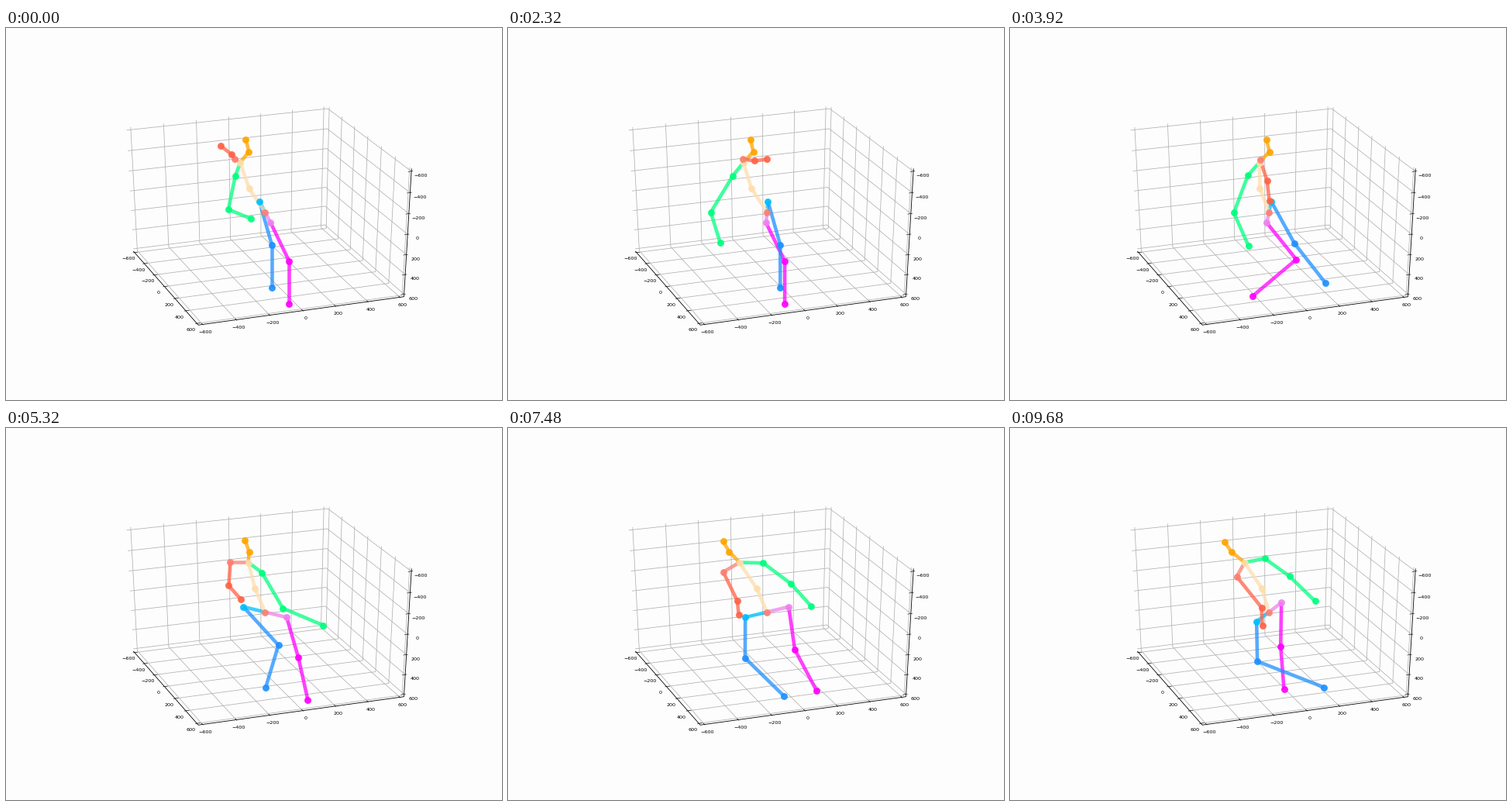
Recreate the animation shown at these times as a matplotlib script. Size 640 px wide and 480 px high, loop 9720 ms.

```python
import numpy as np
import matplotlib.pyplot as plt
from matplotlib.animation import FuncAnimation

W, H, DPI = 640, 480, 100
FRAMES, STEP = 243, 40

fig = plt.figure(figsize=(W / DPI, H / DPI), dpi=DPI, facecolor="#fdfdfd")
ax = fig.add_axes([0, 0, 1, 1])
ax.set_xlim(0, W)
ax.set_ylim(H, 0)
ax.axis("off")

# ---- perspective room ----
ELEV, AZIM, DIST = np.radians(30), np.radians(70), 10
SCALE_X, SCALE_Y, CENTER = 2681, 1798, (334.3, 237.5)
EDGE = 0.5 + 1 / 48


def project(x, y, z):
    """Unit cube centred on zero (y away, z up) to stage pixels."""
    right = x * np.sin(AZIM) - y * np.cos(AZIM)
    near = -x * np.cos(AZIM) - y * np.sin(AZIM)
    up = z * np.cos(ELEV) - near * np.sin(ELEV)
    depth = DIST - near * np.cos(ELEV) - z * np.sin(ELEV)
    return (CENTER[0] + SCALE_X * right / depth,
            CENTER[1] - SCALE_Y * up / depth)


def path(points, color="black", width=0.6, z=1.5):
    xs, ys = zip(*(project(*p) for p in points))
    ax.plot(xs, ys, color=color, lw=width, zorder=z, solid_capstyle="butt")


def label(pos, offset, value):
    x, y = project(*pos)
    text = str(value).replace("-", "\u2212")
    ax.text(x + offset[0], y + offset[1], text, fontsize=4.6,
            family="DejaVu Sans", ha="center", va="center")


def draw_room():
    e, out, inn = EDGE, EDGE + 1 / 120, EDGE - 1 / 60
    for value in range(-600, 601, 200):
        t = value / 1200
        for line in ([(t, e, e), (t, e, -e), (t, -e, -e)],
                     [(e, -t, e), (e, -t, -e), (-e, -t, -e)],
                     [(-e, e, -t), (e, e, -t), (e, -e, -t)]):
            path(line, "#b0b0b0", 0.55, 1)
        path([(t, -out, -e), (t, -inn, -e)], width=0.4)
        path([(-out, -t, -e), (-inn, -t, -e)], width=0.4)
        path([(out, -e, -t), (inn, -e, -t)], width=0.4)
        label((t, -e, -e), (3.4, 10), value)
        label((-e, -t, -e), (-7.8, 8.2), value)
        label((e, -e, -t), (12.2, 5.6), value)
    path([(-e, e, -e), (-e, -e, -e), (e, -e, -e), (e, -e, e)])


draw_room()

# ---- walking figure ----
ROOT = np.array([334.2, 237.5])
time = np.arange(FRAMES) * STEP / 1000


def ease(start, end):
    u = np.clip((time - start) / (end - start), 0, 1)
    return u * u * (3 - 2 * u)


def curve(*keys):
    """Smooth curve through (time, value...) keys."""
    keys = np.array(keys, float)
    t, p = keys[:, 0], keys[:, 1:]
    slope = np.gradient(p, t, axis=0)
    i = np.clip(np.searchsorted(t, time, side="right") - 1, 0, len(t) - 2)
    span = (t[i + 1] - t[i])[:, None]
    u = (time - t[i])[:, None] / span
    out = ((1 + 2 * u) * (1 - u) ** 2 * p[i]
           + u * (1 - u) ** 2 * span * slope[i]
           + u ** 2 * (3 - 2 * u) * p[i + 1]
           + u ** 2 * (u - 1) * span * slope[i + 1])
    return out[:, 0] if p.shape[1] == 1 else out


def vec(x, y):
    return np.column_stack(np.broadcast_arrays(x, y, time))[:, :2]


# The body turns from facing right (90 degrees) to facing left.
yaw = np.radians(curve((0, 77), (2.32, 92), (3.92, 95), (5.32, 29),
                       (7.48, -29), (8.72, -51), (9.68, -60)))
facing = np.sin(yaw)
rightward = np.clip(0.5 + 0.8 * facing, 0, 1)
walk = ease(2.3, 3.4)
cycle = np.interp(time, [2.3, 3.92, 6.97, 8.28, 9.68],
                  [-0.7, 0, 1.5, 2, 2.54])


def leg(side):
    """Hip, knee and ankle; side is 1 for left and -1 for right."""
    phase = 2 * np.pi * (cycle + (0 if side > 0 else 0.5))
    hip = ROOT + side * vec(32 * np.cos(yaw), 14 * np.sin(yaw))
    thigh = ((20 + 14 * walk) * rightward + 4 * side * facing
             + walk * (32 * rightward - 10) * np.sin(phase))
    shank = (45 - (45 + 8 * walk) * rightward
             + walk * (42 - 90 * rightward) * np.cos(phase))
    knee = hip + vec(thigh, (54 - 3 * side * facing)
                     * np.sqrt(1 - (thigh / 100) ** 2))
    ankle = knee + vec(shank, 55 * np.sqrt(1 - (shank / 108) ** 2))
    return hip, knee, ankle


def torso():
    lean = curve((0, -32), (2.32, -30.5), (3.92, -12.5), (5.32, -21.5),
                 (7.48, -35.5), (8.72, -42.5), (9.68, -31.5))
    spine = ROOT + vec(0.46 * lean - 6 * facing, -30.5)
    chest = ROOT + vec(lean, -64)
    neck = chest + vec(15.5 * np.sin(yaw - np.radians(18)) - 2, -14)
    head = neck + vec(2.5 * facing - 6.5, -14 - 2 * facing)
    return spine, chest, neck, head


def shoulder(chest, side):
    turn = yaw + np.radians(12)
    middle = chest + vec(1 - 8 * facing, 6.5)
    return middle + side * vec(27 * np.cos(turn), 13 * np.sin(turn) - 2)


joints = {"root": np.tile(ROOT, (FRAMES, 1))}
for tag, side in (("l", 1), ("r", -1)):
    for part, track in zip(("hip", "knee", "ankle"), leg(side)):
        joints[f"{part}_{tag}"] = track
joints.update(zip(("spine", "chest", "neck", "head"), torso()))
for tag, side in (("l", 1), ("r", -1)):
    joints[f"shoulder_{tag}"] = shoulder(joints["chest"], side)

# upper arms and forearms as offsets from the joint above
joints["elbow_l"] = joints["shoulder_l"] + curve(
    (0, -9, 43), (3.92, -18, 48), (5.32, 27, 46),
    (7.48, 36, 27), (8.72, 50, 17), (9.68, 32, 23))
joints["wrist_l"] = joints["elbow_l"] + curve(
    (0, 29, 12), (3.92, 19, 43), (5.32, 52, 22),
    (7.48, 26, 29), (9.68, 33, 32))
joints["elbow_r"] = joints["shoulder_r"] + curve(
    (0, -4, -6), (1.3, -9, -11), (2.32, 15, 2), (3.92, 9, 27),
    (5.32, -2, 30), (7.48, 18, 37), (9.68, 32, 40))
joints["wrist_r"] = joints["elbow_r"] + curve(
    (0, -14, -11), (1.3, -21, -18), (2.32, 16, -2), (3.92, 3, 26),
    (5.32, 16, 18), (7.48, 2, 18), (9.68, 1, 23))

# chains of joints with the colour of each bone
CHAINS = [
    ("root hip_l knee_l ankle_l", "violet magenta magenta"),
    ("root hip_r knee_r ankle_r", "deepskyblue dodgerblue dodgerblue"),
    ("root spine chest neck head", "navajowhite navajowhite orange orange"),
    ("chest shoulder_l elbow_l wrist_l", "springgreen " * 3),
    ("chest shoulder_r elbow_r wrist_r", "salmon tomato tomato"),
]


def dot(color):
    return ax.plot([], [], "o", color=color, ms=6.4, mew=0, alpha=0.92,
                   zorder=3)[0]


dots = {"root": dot("salmon")}
bones = []
for names, colors in CHAINS:
    names = names.split()
    for start, end, color in zip(names, names[1:], colors.split()):
        line, = ax.plot([], [], color=color, lw=3.3, alpha=0.75, zorder=2,
                        solid_capstyle="butt")
        bones.append((line, start, end))
        dots[end] = dot(color)


def draw(frame):
    for line, start, end in bones:
        line.set_data(*zip(joints[start][frame], joints[end][frame]))
    for name, mark in dots.items():
        x, y = joints[name][frame]
        mark.set_data([x], [y])
    return [bone[0] for bone in bones] + list(dots.values())


anim = FuncAnimation(fig, draw, frames=FRAMES, interval=STEP,
                     repeat=True, repeat_delay=0)
plt.show()
```
